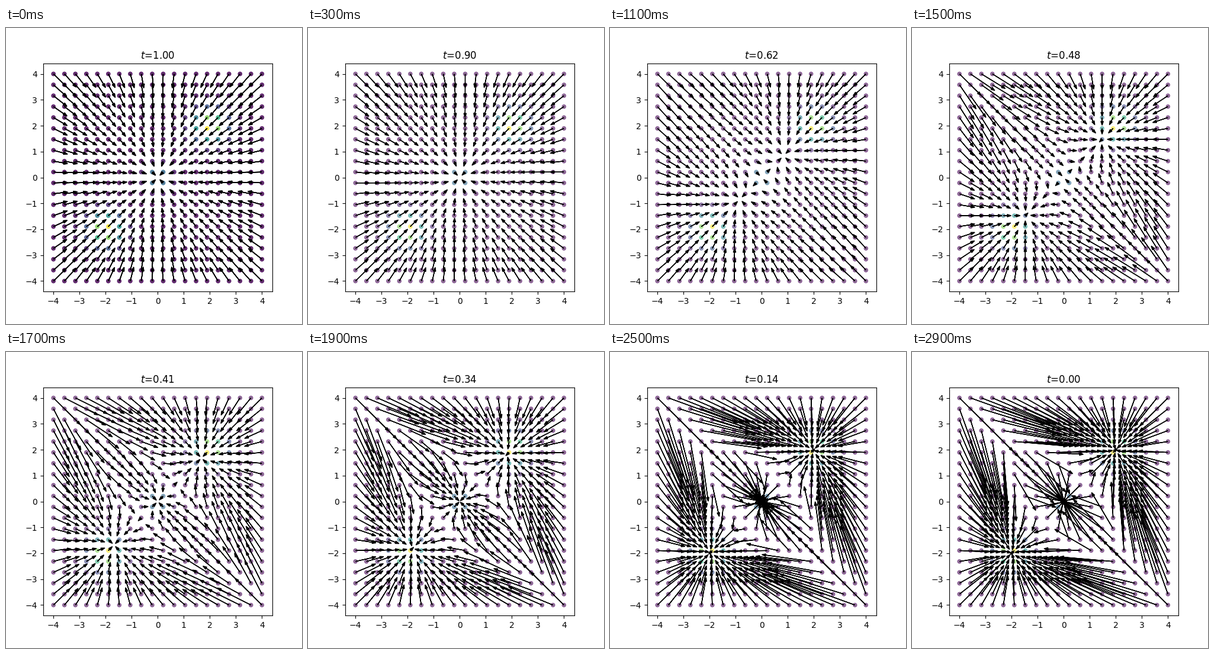
Write a matplotlib script that moves like this. It is 500 px wide and 500 px high and loops after 3000 ms.

```python
import numpy as np
import matplotlib.pyplot as plt
from matplotlib.animation import FuncAnimation
from matplotlib.collections import PolyCollection

FRAMES = 30
SCALE = 0.1
SHAFT, HEAD_W, HEAD_L = 0.001, 0.1, 0.15

# Gaussian mixture: weights, means and isotropic variances
weights = np.array([4, 1, 4]) / 9
means = np.array([[2.0, 2.0], [0.0, 0.0], [-2.0, -2.0]])
variances = np.array([0.2, 0.1, 0.2])

axis = np.linspace(-4, 4, 20)
points = np.stack(np.meshgrid(axis, axis), -1).reshape(-1, 2)


def components(x, mu, var):
    """Log of each weighted component density, and offsets to the means."""
    diff = mu - x[:, None]
    log_p = np.log(weights / (2 * np.pi * var)) - (diff ** 2).sum(-1) / (2 * var)
    return log_p, diff


def score(x, t):
    """Score of the mixture diffused to time t (linear log-SNR)."""
    alpha2 = 1 / (1 + np.exp(10 * t - 5))
    var = alpha2 * variances + 1 - alpha2
    log_p, diff = components(x, np.sqrt(alpha2) * means, var)
    resp = np.exp(log_p - log_p.max(1, keepdims=True))
    resp /= resp.sum(1, keepdims=True)
    return ((resp / var)[..., None] * diff).sum(1)


def arrow_outlines(start, vec):
    length = np.hypot(vec[:, 0], vec[:, 1])
    along = vec / length[:, None]
    across = np.stack([-along[:, 1], along[:, 0]], -1)
    zero, tip = np.zeros_like(length), length + HEAD_L
    outline = [(tip, 0), (length, -HEAD_W / 2), (length, -SHAFT / 2),
               (zero, -SHAFT / 2), (zero, SHAFT / 2),
               (length, SHAFT / 2), (length, HEAD_W / 2)]
    return np.stack([start + u[:, None] * along + v * across
                     for u, v in outline], 1)


fig, ax = plt.subplots(figsize=(5, 5), dpi=100)
density = np.exp(components(points, means, variances)[0]).sum(1)


def add_layer():
    dots = ax.scatter(*points.T, c=density, s=20, alpha=0.5)
    arrows = PolyCollection([], facecolor="black", edgecolor="black",
                            linewidth=1, joinstyle="miter", zorder=1)
    ax.add_collection(arrows, autolim=False)
    return dots, arrows


# The first frame is painted twice, which makes its dots denser
under, top = add_layer(), add_layer()
title = ax.set_title("")


def update(i):
    t = 1 - i / (FRAMES - 1)
    outlines = arrow_outlines(points, SCALE * score(points, t))
    for layer in (under, top):
        layer[1].set_verts(outlines)
    for artist in under:
        artist.set_visible(i == 0)
    lo, hi = outlines.min((0, 1)), outlines.max((0, 1))
    pad = 0.05 * (hi - lo)
    ax.set_xlim(lo[0] - pad[0], hi[0] + pad[0])
    ax.set_ylim(lo[1] - pad[1], hi[1] + pad[1])
    title.set_text(f"$t$={t:.2f}")
    return [*under, *top, title]


anim = FuncAnimation(fig, update, frames=FRAMES, interval=100,
                     repeat=True, repeat_delay=0, blit=False)
plt.show()
```
